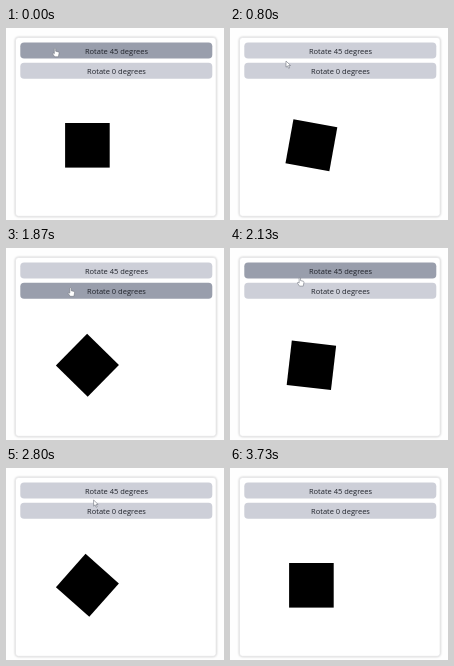
Animation of 218 by 192 pixels, one loop 3990 ms. Source, as an HTML page:

```html
<!DOCTYPE html>
<html lang="en">
<head>
<meta charset="utf-8">
<title>Rotating square</title>
<style>
  html, body { margin: 0; width: 100%; height: 100%; overflow: hidden; background: #fefefe; }
  svg { display: block; width: 100vw; height: 100vh; }
  text { font: 7.5px "Open Sans", "Noto Sans", sans-serif; text-anchor: middle; fill: #20232b; }
  .card { fill: #fff; stroke: #e6e6e8; stroke-width: .8; filter: drop-shadow(0 .8px 1.2px rgba(0, 0, 0, .22)); }
  .cursor { fill: #fff; stroke: #70747f; stroke-width: .6; stroke-linejoin: round; }
</style>
</head>
<body>
<svg viewBox="0 0 218 192">
  <rect class="card" x="9.5" y="9.5" width="200.6" height="178.8" rx="3"/>
  <rect id="turn" x="14.3" y="14.5" width="192" height="16" rx="3.8"/>
  <text x="110.5" y="25.6">Rotate 45 degrees</text>
  <rect id="reset" x="14.3" y="34.7" width="192" height="16" rx="3.8"/>
  <text x="110.5" y="45.8">Rotate 0 degrees</text>
  <rect id="square" x="59.1" y="95" width="44.6" height="44.6"/>
  <path id="arrow" class="cursor" d="M0 0V6.2L1.5 4.9L2.6 7.3L3.7 6.8L2.6 4.5H4.6Z"/>
  <path id="hand" class="cursor" d="M-.7 .6Q0 -.4 .7 .6V3.2L3.5 3.9Q4.3 4.2 4.1 5.2L3.4 8.8H-.3L-2.3 5.9Q-2.5 4.9 -1.6 5L-.7 5.7Z"/>
</svg>
<script>
  const LOOP = 3990, STEP = 200 / 3, DURATION = 500;
  const get = id => document.getElementById(id);
  const [turn, reset, square, arrow, hand] = ["turn", "reset", "square", "arrow", "hand"].map(get);

  // Clicks alternate between 45 and 0 degrees.
  const clicks = [30, 565, 1230, 1855, 2467, 3050];

  // Pointer tip: time, x, y
  const path = [
    [0, 49, 20], [70, 49, 20], [530, 53, 41], [600, 53, 41],
    [800, 56, 33], [1030, 61, 24], [1250, 61, 24],
    [1400, 64, 34], [1700, 64.5, 39.5], [1880, 64.5, 39.5],
    [2330, 74, 21.5], [2540, 74, 21.5],
    [3000, 98, 40], [3200, 108.5, 44], [3390, 117, 58]
  ];

  const bezier = (a, b, u) => 3 * a * u * (1 - u) ** 2 + 3 * b * u * u * (1 - u) + u ** 3;

  // CSS "ease" curve
  function ease(p) {
    if (p <= 0) return 0;
    if (p >= 1) return 1;
    let lo = 0, hi = 1;
    for (let i = 0; i < 24; i++) {
      const mid = (lo + hi) / 2;
      if (bezier(.25, .25, mid) < p) lo = mid; else hi = mid;
    }
    return bezier(.1, 1, lo);
  }

  function angleAt(t) {
    return clicks.reduce((angle, start, i) => {
      const goal = i % 2 ? 0 : 45;
      return angle + (goal - angle) * ease((t - start) / DURATION);
    }, 0);
  }

  function pointerAt(t) {
    const i = path.findIndex(p => p[0] > t);
    if (i < 0) return null;
    const [t0, x0, y0] = path[i - 1], [t1, x1, y1] = path[i];
    const f = (t - t0) / (t1 - t0);
    return [x0 + (x1 - x0) * f, y0 + (y1 - y0) * f];
  }

  const show = (el, on) => el.setAttribute("visibility", on ? "visible" : "hidden");

  function render(ms) {
    const tick = Math.floor((Math.floor(ms / 10) * 10 + 5) / STEP);
    const t = tick * STEP;
    square.setAttribute("transform", `rotate(${angleAt(t)} 81.4 117.3)`);

    const tip = pointerAt(t);
    const over = top => !!tip && tip[1] >= top && tip[1] <= top + 16;
    const onTurn = over(14.5), onReset = over(34.7);
    turn.setAttribute("fill", onTurn ? "#999eac" : "#cdcfd8");
    reset.setAttribute("fill", onReset ? "#999eac" : "#cdcfd8");

    const active = onTurn || onReset;
    show(hand, tip && active);
    show(arrow, tip && !active);
    if (tip) for (const el of [hand, arrow]) el.setAttribute("transform", `translate(${tip})`);
  }

  const begin = performance.now();
  function frame() {
    render((performance.now() - begin) % LOOP);
    requestAnimationFrame(frame);
  }
  frame();
</script>
</body>
</html>
```
